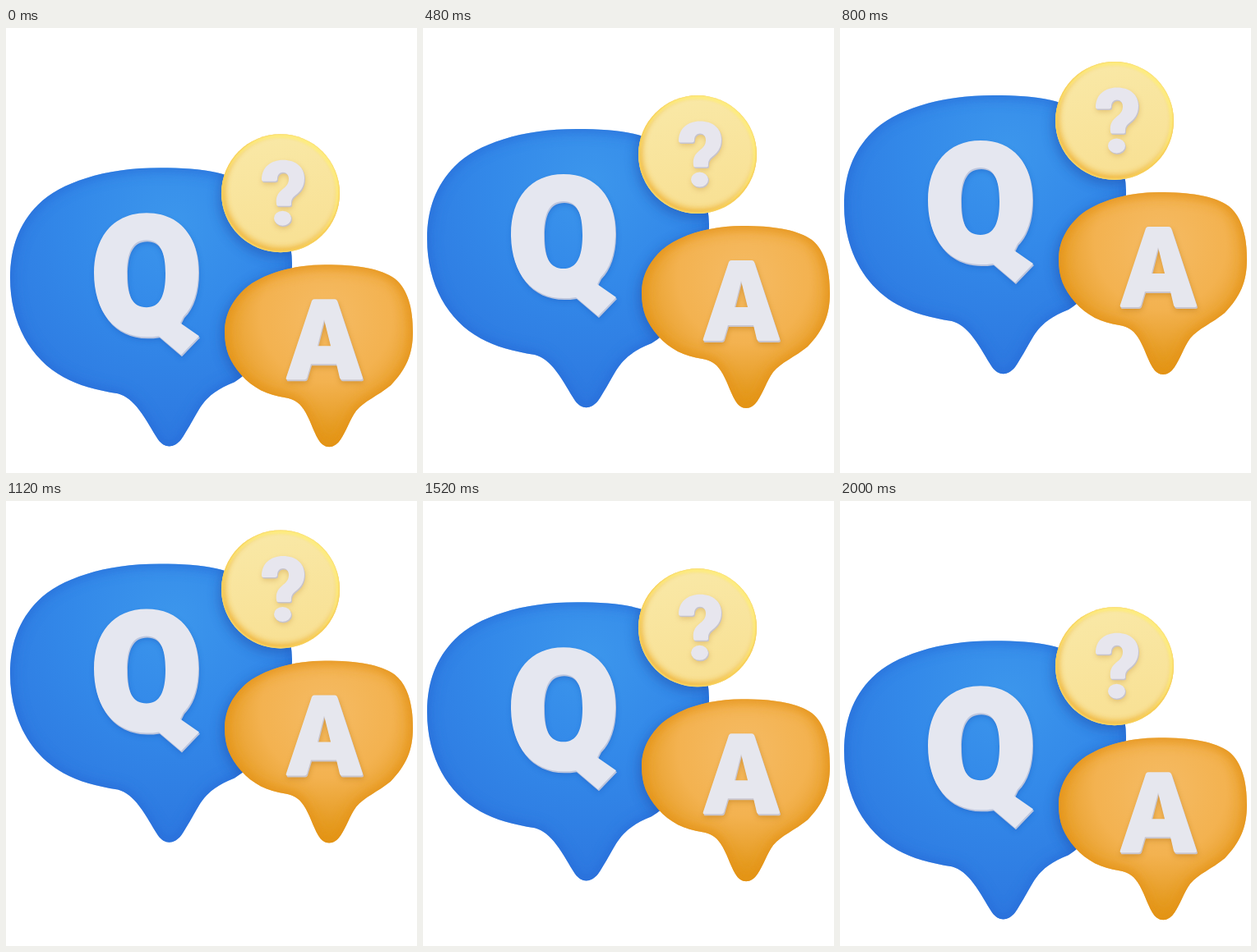
Write an HTML page that moves like this. It is 500x542 px and loops after 2.04 s.

```html
<!DOCTYPE html>
<html lang="en">
<head>
<meta charset="utf-8">
<title>Questions and answers</title>
<style>
  html, body { margin: 0; width: 100%; height: 100%; overflow: hidden; background: #fff; }
  svg { display: block; width: 500px; height: 542px; }
</style>
</head>
<body>
<svg viewBox="0 0 500 542" role="img" aria-label="Q and A">
  <defs>
    <path id="blue" d="M5 303C5 268 15 238 39 214C66 187 120 169 187 169C220 169 246 171 268 178C320 196 347 235 348 285C349 330 320 405 278 430C255 439 244 449 235 463C226 478 220 490 213 500C204 511 193 511 185 500C177 488 172 477 162 464C154 453 146 447 136 444C110 440 88 434 70 424C30 402 5 358 5 303Z"/>
    <path id="orange" d="M266 369C266 346 277 329 291 316C312 298 350 287 388 287C428 287 456 292 473 304C489 317 495 340 495 369C495 396 487 414 468 434C452 447 436 453 426 465C418 476 414 490 407 500C399 512 387 512 380 500C373 488 370 475 362 463C356 454 350 451 340 449C318 446 300 437 286 421C272 405 266 390 266 369Z"/>
    <circle id="coin" cx="334" cy="200" r="72"/>
    <path id="q" fill-rule="evenodd" d="M107 297C107 253 131 224 171 224C211 224 234 252 234 295C234 319 228 338 216 350L212 358L235 374L213 397L186 374C181 375 176 375 171 375C131 375 107 343 107 297ZM147 298C147 325 154 339 171 339C187 339 194 325 194 298C194 271 187 257 171 257C154 257 147 271 147 298Z"/>
    <path id="a" fill-rule="evenodd" d="M375 329H400Q402 329 403 331L434 425Q434 427 432 427H409Q407 427 406 425L402 408H371L366 425Q365 427 363 427H342Q340 427 341 424L372 331Q373 329 375 329ZM387 354L379 386H395Z"/>
    <path id="mark" d="M311 183C311 168 322 159 337 159C353 159 363 168 363 181C363 193 357 198 352 202C347 206 347 209 347 213Q347 215 345 215H331Q329 215 329 213C328 205 330 200 336 195C341 191 344 188 344 182C344 177 341 174 337 174C333 174 330 177 330 182Q330 185 327 185H314Q311 185 311 183ZM326 230A10.5 9 0 1 0 347 230A10.5 9 0 1 0 326 230Z"/>

    <clipPath id="inBlue"><use href="#blue"/></clipPath>
    <clipPath id="inOrange"><use href="#orange"/></clipPath>
    <clipPath id="inCoin"><use href="#coin"/></clipPath>

    <radialGradient id="blueFill" gradientUnits="userSpaceOnUse" cx="205" cy="235" r="270">
      <stop offset="0" stop-color="#3c96ec"/>
      <stop offset=".45" stop-color="#3389e9"/>
      <stop offset="1" stop-color="#2d78e0"/>
    </radialGradient>
    <radialGradient id="orangeFill" gradientUnits="userSpaceOnUse" cx="390" cy="350" r="160">
      <stop offset="0" stop-color="#f5bb64"/>
      <stop offset=".5" stop-color="#f3b250"/>
      <stop offset="1" stop-color="#e0920f"/>
    </radialGradient>
    <linearGradient id="coinFill" x1=".4" y1="0" x2=".6" y2="1">
      <stop offset="0" stop-color="#f9e8a6"/>
      <stop offset="1" stop-color="#f8e093"/>
    </linearGradient>

    <filter id="soft" x="-30%" y="-30%" width="160%" height="160%"><feGaussianBlur stdDeviation="7"/></filter>
    <filter id="edge" x="-20%" y="-20%" width="140%" height="140%"><feGaussianBlur stdDeviation="3"/></filter>
    <filter id="fine" x="-20%" y="-20%" width="140%" height="140%"><feGaussianBlur stdDeviation="1.2"/></filter>
  </defs>

  <g id="float">
    <use href="#blue" fill="url(#blueFill)"/>
    <g clip-path="url(#inBlue)">
      <use href="#blue" fill="none" stroke="#2a6edc" stroke-width="12" opacity=".5" filter="url(#soft)"/>
      <use href="#blue" fill="none" stroke="#2868d0" stroke-width="4" opacity=".4" filter="url(#edge)"/>
      <use href="#coin" x="-3" y="6" fill="#2456b4" opacity=".6" filter="url(#soft)"/>
      <use href="#orange" x="-4" y="3" fill="#2456b4" opacity=".6" filter="url(#soft)"/>
      <use href="#q" x="1" y="4" fill="#1f5fc4" opacity=".5" filter="url(#edge)"/>
    </g>
    <use href="#q" x="1" y="2" fill="#bcc5dd"/>
    <use href="#q" fill="#e5e7f0"/>

    <use href="#coin" fill="url(#coinFill)"/>
    <g clip-path="url(#inCoin)">
      <use href="#coin" x="2" y="-3" fill="none" stroke="#eeb032" stroke-width="6" opacity=".8" filter="url(#edge)"/>
      <use href="#coin" x="-1" y="1" fill="none" stroke="#fff07c" stroke-width="7" opacity=".75" filter="url(#fine)"/>
      <use href="#coin" x="1" y="-2" fill="none" stroke="#f0aa30" stroke-width="3" opacity=".5" filter="url(#fine)"/>
      <use href="#mark" x="1" y="4" fill="#d2a552" opacity=".55" filter="url(#edge)"/>
    </g>
    <use href="#mark" x="1" y="2" fill="#c6c3cc"/>
    <use href="#mark" y=".5" fill="#e7e6ee"/>

    <use href="#orange" fill="url(#orangeFill)"/>
    <g clip-path="url(#inOrange)">
      <use href="#orange" fill="none" stroke="#e8981e" stroke-width="14" opacity=".65" filter="url(#soft)"/>
      <use href="#orange" fill="none" stroke="#e29018" stroke-width="5" opacity=".6" filter="url(#edge)"/>
      <use href="#a" x="1" y="4" fill="#bd7a18" opacity=".55" filter="url(#edge)"/>
    </g>
    <use href="#a" x="1" y="2" fill="#c9c5cd"/>
    <use href="#a" fill="#e6e7ee"/>
  </g>
</svg>
<script>
  const LOOP = 2040, STEP = 40;
  const MID = -47.3, SWING = 48.6, LEAD = 21;
  const float = document.getElementById('float');

  function draw(now) {
    const t = Math.floor((now % LOOP) / STEP) * STEP;
    const y = MID + SWING * Math.cos(2 * Math.PI * (t + LEAD) / LOOP);
    float.setAttribute('transform', `translate(0 ${y.toFixed(2)})`);
  }

  const start = performance.now();
  function tick() {
    draw(performance.now() - start);
    requestAnimationFrame(tick);
  }
  tick();
</script>
</body>
</html>
```
